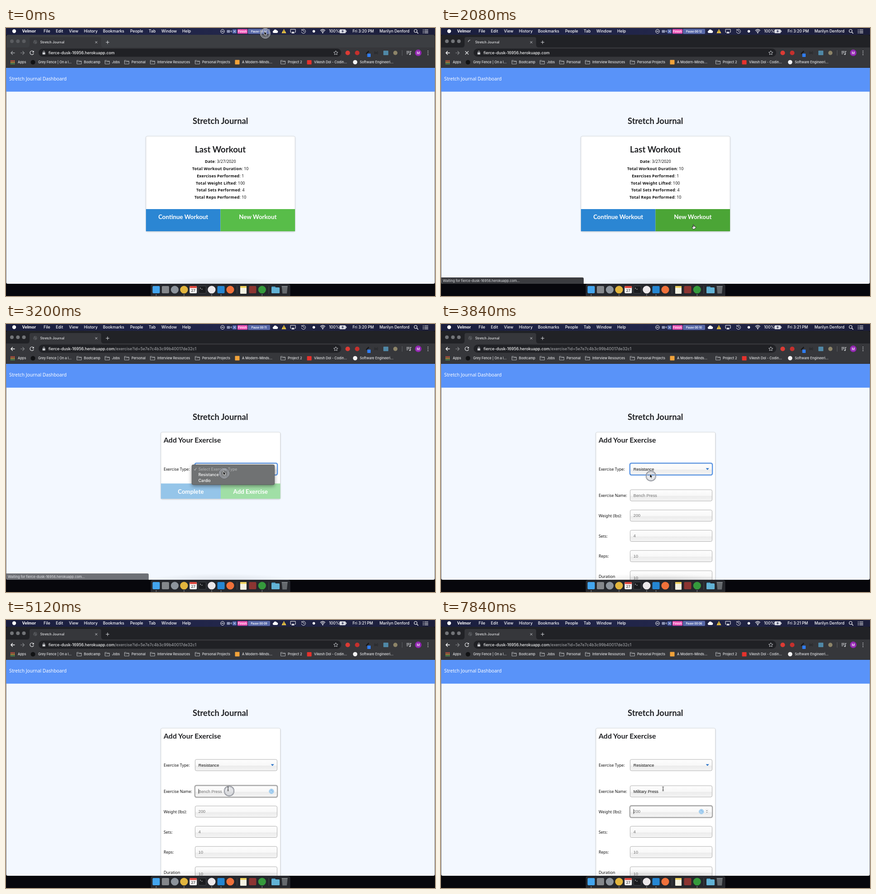
Animation of 947x592 px, one loop 8 s. Source, as an HTML page:

```html
<!DOCTYPE html>
<html lang="en">
<head>
<meta charset="utf-8">
<title>Workout demo</title>
<style>
html, body { margin: 0; width: 100%; height: 100%; overflow: hidden; background: #07070c; }
svg { display: block; width: 947px; height: 592px; }
text { white-space: pre; }
.ui { font-family: Inter, "Liberation Sans", sans-serif; font-weight: 500; }
.head { font-family: Lato, sans-serif; font-weight: 700; }
.body { font-family: "Noto Sans", "Open Sans", sans-serif; font-weight: 500; }
.form { font-family: "Liberation Sans", Arial, sans-serif; }
.strong { font-weight: 600; }
</style>
</head>
<body>
<svg id="stage" viewBox="0 0 947 592" xmlns="http://www.w3.org/2000/svg"></svg>
<script>
const LOOP = 8000, STEP = 160;
const APP = 'Stretch Journal';
const HOST = 'fierce-dusk-16956.herokuapp.com';

// Markup helpers
const text = (cls, x, y, size, fill, s, more = '') =>
  `<text class="${cls}" x="${x}" y="${y}" font-size="${size}" fill="${fill}" ${more}>${s}</text>`;
const rect = (x, y, w, h, fill, r = 0, more = '') =>
  `<rect x="${x}" y="${y}" width="${w}" height="${h}" rx="${r}" fill="${fill}" ${more}/>`;
const disc = (x, y, r, fill, more = '') =>
  `<circle cx="${x}" cy="${y}" r="${r}" fill="${fill}" ${more}/>`;
const line = (d, stroke, w = 1, more = '') =>
  `<path d="${d}" fill="none" stroke="${stroke}" stroke-width="${w}" ${more}/>`;
const shape = (d, fill, more = '') => `<path d="${d}" fill="${fill}" ${more}/>`;
const group = (id, s, more = '') => `<g id="${id}" ${more}>${s}</g>`;
const mid = 'text-anchor="middle"';

const defs = `<defs>
  <linearGradient id="bar"><stop stop-color="#1a1e3e"/><stop offset=".5" stop-color="#22264a"/><stop offset="1" stop-color="#1c1e3a"/></linearGradient>
  <linearGradient id="gloss" x2="0" y2="1"><stop stop-color="#fdfdfd"/><stop offset=".52" stop-color="#f8f8f8"/>
    <stop offset=".58" stop-color="#ececec"/><stop offset="1" stop-color="#f5f5f5"/></linearGradient>
  <radialGradient id="halo"><stop offset=".3" stop-color="#000" stop-opacity=".07"/><stop offset="1" stop-color="#000" stop-opacity="0"/></radialGradient>
  <filter id="shade" x="-10%" y="-10%" width="120%" height="125%"><feDropShadow dx="0" dy="1" stdDeviation="1.3" flood-opacity=".24"/></filter>
  <filter id="deep" x="-10%" y="-30%" width="120%" height="180%"><feDropShadow dx="0" dy="3" stdDeviation="4" flood-opacity=".4"/></filter>
  <clipPath id="view"><rect x=".5" y="15" width="946" height="550" rx="3.5"/></clipPath>
</defs>`;

function menuBar() {
  const items = [['File', 83], ['Edit', 110], ['View', 139], ['History', 172], ['Bookmarks', 214],
    ['People', 274], ['Tab', 315], ['Window', 343], ['Help', 389]];
  const white = '#fff', size = 8.75;
  return rect(0, 0, 947, 15, 'url(#bar)') + disc(18, 7, 4.2, white) +
    text('ui', 35.5, 10.3, size, white, 'Velmor', 'style="font-weight:700"') +
    items.map(([s, x]) => text('ui', x, 10.3, size, white, s)).join('') +
    disc(478, 7.3, 4.2, 'none', 'stroke="#fff"') + line('M475.5 7.3H480.5', white, 1.2) +
    rect(487.5, 4.5, 7, 6, '#8f96b5', 1) + shape('M495 7L498.5 4.6V10.4Z', '#8f96b5') +
    rect(500, 3, 9, 9, '#5467ac', 1) + line('M502.5 5.5L506.5 9.5M506.5 5.5L502.5 9.5', white, 1) +
    rect(511, 2.5, 22, 10, '#ee4fb4', 1) + text('ui strong', 522, 9.8, 6.7, white, 'Finish', mid) +
    rect(534.5, 2.5, 48, 10, '#5667a8', 1, 'stroke="#7383c2" stroke-width=".7"') +
    text('ui strong', 558.5, 9.6, 5.9, white, '', mid + ' id="pause"') +
    shape('M591 11a2.6 2.6 0 0 1-.3-5.1 3.8 3.8 0 0 1 7-.6 2.9 2.9 0 0 1 .5 5.7Z', white) +
    shape('M613.5 2.2L618.6 11.6H608.4Z', '#f6cf4a') + line('M613.5 5V8.4M613.5 9.4V10.4', '#4b3a10', 1.1) +
    line('M630.5 9.3H628V3H639V9.3H636.5', white, 1) + shape('M633.5 7.2L637 11.8H630Z', white) +
    line('M653.2 4.6a4.5 4.5 0 1 1-.9 3.4M652.4 2.8L653 5.3 655.6 4.9M657 4.6V7.5L659 8.6', white, .9) +
    disc(679.5, 7.3, 2.8, white) +
    line('M693.8 5.6Q699.2 .9 704.6 5.6M695.6 7.7Q699.2 4.7 702.8 7.7M697.4 9.6Q699.2 8.1 701 9.6', white, 1.3) +
    disc(699.2, 11, .9, white) +
    text('ui', 713, 10.3, 8.5, white, '100%') + rect(736.5, 3.5, 13, 7.5, '#d6d8e2', 1.2, 'stroke="#fff" stroke-width=".8"') +
    rect(750.5, 5.5, 1.2, 3.5, white) + shape('M744 3.5L740.5 7.8H743L742 11 745.8 6.6H743.2Z', '#24284a') +
    text('ui', 765, 10.3, 8.6, white, '', 'id="clock"') +
    text('ui', 824.5, 10.3, 8.6, white, 'Marilyn Denford') +
    disc(904.2, 6.5, 3.2, 'none', 'stroke="#fff" stroke-width="1.1"') + line('M906.6 8.9L910 12.2', white, 1.3) +
    line('M920 4H922M923.5 4H932M920 7.3H922M923.5 7.3H932M920 10.6H922M923.5 10.6H932', white, 1.2);
}

const folder = x => line(`M${x - 5} 71.5h3.6l1.4 1.5h5v6.5h-10Z`, '#b9bbbf', .9) + line(`M${x - 5} 74.4h10`, '#b9bbbf', .8);

function browser() {
  const icon = '#d0d2d6', tab = '#36373b';
  const folders = [['Bootcamp', 172], ['Jobs', 234], ['Personal', 277], ['Interview Resources', 334],
    ['Personal Projects', 433], ['Project 2', 622]];
  const links = [['Apps', 26], ['Grey Fence | On a l...', 71], ['A Modern-Minds...', 521],
    ['Vikesh Dol - Codin...', 680], ['Software Engineeri...', 781]];
  const label = ([s, x]) => text('ui', x, 78.3, 7.45, '#e2e3e5', s);
  let dots = '';
  for (let i = 0; i < 9; i++)
    dots += rect(10.2 + i % 3 * 3.3, 71.3 + (i / 3 | 0) * 3.3, 2.3, 2.3, ['#e2553f', '#e9a93a', '#57ab5c'][i / 3 | 0]);

  return rect(.5, 15, 946, 73, '#212226', 3.5, 'id="strip"') +
    group('lights', [13, 26.3, 39.5].map(x => disc(x, 29.3, 4)).join('')) +
    shape('M46 43Q52 43 52 37V24Q52 20 56 20H206Q210 20 210 24V37Q210 43 216 43Z', tab) +
    rect(.5, 43, 946, 45, tab) + rect(.5, 87.2, 946, .8, '#2b2c30') +
    group('globe', disc(64.5, 31, 4.4, '#55575b') + line('M61 29.4Q64 31 63.5 34.8M65 27.2Q64.5 30 68.4 31', tab, 1)) +
    line('M60.3 31A4.3 4.3 0 0 1 64.5 26.7', '#d5d7db', 1.3, 'id="spinner"') +
    text('ui', 75.5, 33.8, 7.3, '#e4e5e7', APP) +
    line('M197 29.3L201.5 33.8M201.5 29.3L197 33.8', icon, 1) + line('M220.5 31.5H228M224.2 27.8V35.3', icon, 1.1) +
    line('M19.5 55H11M14.8 51L10.9 55 14.8 59', '#fff', 1.3, 'id="back"') +
    line('M32 55H40.3M36.5 51L40.4 55 36.5 59', '#85878b', 1.2) +
    group('reload', line('M60.6 52.2A4.2 4.2 0 1 0 61.2 56', '#e4e5e7', 1.2) + shape('M61.6 50.2V54H57.8Z', '#e4e5e7')) +
    group('stop', line('M53.5 51.3L60.7 58.5M60.7 51.3L53.5 58.5', '#e4e5e7', 1.3)) +
    rect(72, 45.5, 668, 18, '#202125', 9) +
    rect(80.6, 54, 6, 4.6, icon, .7) + line('M82 54V52.4a1.6 1.6 0 0 1 3.2 0V54', icon, 1) +
    `<text class="ui" x="93.7" y="58" font-size="8.8" fill="#f0f1f2">${HOST}<tspan id="path" fill="#9b9da1"></tspan></text>` +
    line('M728 50.2L729.4 53.2 732.7 53.6 730.3 55.8 730.9 59 728 57.4 725.1 59 725.7 55.8 723.3 53.6 726.6 53.2Z', icon, .9) +
    disc(754.3, 55, 5.1, '#dc3b34') + disc(775.3, 55, 5.1, '#c5302d') +
    line('M795 57L801 51', '#17181a', 2.5) + rect(797.5, 56.5, 7.5, 7.5, '#2f7cf0', .8) +
    text('ui', 817, 57.4, 7, '#1b1c1f', '(x)', mid) + rect(833, 50, 11, 10, '#4f87a6', 1) +
    disc(859.5, 55, 4.7, '#8d8468') + line('M874.5 49V61', '#5b5d61', 1) +
    line('M884 51.5H891M884 54.2H891M884 57H888M892.8 58V51.5H895', icon, 1.2) + disc(891.6, 58, 1.5, icon) +
    disc(910, 54.8, 7.2, '#9327b2') + text('ui', 910, 57.5, 7.3, '#fff', 'M', mid) +
    [51, 55, 59].map(y => disc(931.5, y, 1, icon)).join('') +
    dots + disc(59.5, 75.7, 5, '#111214') + rect(505.5, 70.5, 10, 10, '#f1a33a', 1) +
    rect(664.5, 71, 10, 9.5, '#e5322d', 1) + disc(770.7, 75.5, 4.8, '#f2f2f3') +
    folders.map(f => folder(f[1] - 10.5) + label(f)).join('') + links.map(label).join('');
}

const card = (x, w, h) => rect(x, 239, w, h, '#fff', 3, 'stroke="#d0d2d5" stroke-width=".8" filter="url(#shade)"');
const button = (x, y, w, h, fill, s, id, base) =>
  rect(x, y, w, h, fill, 0, `id="${id}"`) + text('head', x + w / 2, base, 13.3, '#fff', s, mid);

function homePage() {
  const rows = [['Date', '3/27/2020'], ['Total Workout Duration', 10], ['Exercises Performed', 1],
    ['Total Weight Lifted', 100], ['Total Sets Performed', 4], ['Total Reps Performed', 10]];
  return group('home', card(309, 329, 210) +
    text('head', 473.2, 274.8, 18.6, '#202124', 'Last Workout', mid) +
    rows.map(([k, v], i) => text('body', 473.2, 298.4 + i * 15.75, 8.85, '#111',
      `<tspan font-weight="700" letter-spacing=".24">${k}</tspan>: ${v}`, mid)).join('') +
    button(309, 400, 164.5, 49, '#2b86d3', 'Continue Workout', 'resume', 422) +
    button(473.5, 400, 164.5, 49, '#58bd49', 'New Workout', 'fresh', 422));
}

const field = y => rect(417.5, y, 181, 25, 'url(#gloss)', 3.2, 'stroke="#a8a8a8" stroke-width=".9"');
const label = (y, s) => text('body', 348, y, 8.8, '#111', s);
const focusRing = (id, y, stroke) =>
  rect(416.9, y - .6, 182.2, 26.2, 'none', 3.6, `id="${id}" stroke="${stroke}" stroke-width="2.4"`);
const helper = (id, x, y) => group(id, disc(x, y, 5, '#d6ebfb', 'stroke="#6bb0e6" stroke-width="1"') +
  disc(x, y, 2.9, 'none', 'stroke="#3f92d8" stroke-width=".8"') + line(`M${x} ${y - 2}V${y}H${x + 1.7}`, '#3f92d8', .8));

function exercisePage() {
  const inputs = [['Exercise Name:', 366, 'Bench Press', 'name'], ['Weight (lbs):', 410.8, '200', 'weight'],
    ['Sets:', 455.5, '4', 'sets'], ['Reps:', 500.2, '10', 'reps'], ['Duration', 545, '10', 'time']];
  const more = inputs.map(([s, y, hint, id], i) => label(i < 4 ? y + 16.2 : 561, s) + field(y) +
    text('form', 424.8, y + (i < 4 ? 15.6 : 18.8), 9.2, '#707070', hint, `id="${id}"`)).join('');
  return group('exercise',
    group('short', card(342, 263.5, 147) +
      button(342, 352.3, 132, 33.7, '#95c5e9', 'Complete', 'done', 375) +
      button(474, 352.3, 131.5, 33.7, '#a0dfa6', 'Add Exercise', 'add', 375)) +
    group('long', card(342, 263.5, 400) + more +
      helper('nameHelp', 586, 378.5) + helper('weightHelp', 574.8, 423.2) +
      group('stepper', rect(584, 418, 6, 10.5, '#fbfbfb', 2, 'stroke="#ccc" stroke-width=".5"') +
        shape('M585.5 422L587 420 588.5 422ZM585.5 424.5L587 426.5 588.5 424.5Z', '#555')) +
      focusRing('nameRing', 366, '#a9a9a9') + focusRing('weightRing', 410.8, '#a9a9a9') +
      rect(0, 0, .9, 10.5, '#222', 0, 'id="caret"')) +
    text('head', 348, 261.8, 15.9, '#202124', 'Add Your Exercise') +
    label(324.2, 'Exercise Type:') + field(308) + focusRing('typeRing', 308, '#5b96e6') +
    text('form', 424.8, 323.7, 9.2, '#111', '', 'id="type"') + shape('M584.6 318.4H591.8L588.2 322.6Z', '#2a72c8') +
    group('menu', rect(410.3, 311, 182.4, 44, '#707273', 3, 'stroke="#4d4f50" stroke-width=".8" filter="url(#deep)"') +
      rect(410.7, 326.7, 181.6, 12.4, '#2f73dc', 0, 'id="pick"') +
      line('M415.3 320.8L417.2 323 420.3 317.8', '#b5b6b7', 1.1) +
      text('ui', 424.8, 323.6, 8.6, '#adaeaf', 'Select Exercise Type') +
      text('ui', 424.8, 336, 8.6, '#fff', 'Resistance') + text('ui', 424.8, 348.5, 8.6, '#fff', 'Cardio')));
}

const page = () => `<g clip-path="url(#view)">` + rect(0, 88, 947, 477, '#f3f8ff') + rect(0, 88, 947, 52.6, '#5993f9') +
  text('body', 7, 115.6, 10.25, '#fff', APP + ' Dashboard') +
  text('head', 473.2, 212.3, 18.4, '#202124', APP, mid) +
  homePage() + exercisePage() +
  group('status', shape('M0 551H312Q315 551 315 554V566H0Z', '#3b3c40') +
    text('ui', 4, 560.8, 7.4, '#c9cacd', `Waiting for ${HOST}...`)) +
  '<ellipse cx="473" cy="567" rx="168" ry="16" fill="url(#halo)"/></g>';

function dock() {
  const round = (x, c) => disc(x, 578, 8.6, c), square = (x, c) => rect(x - 8, 570, 16, 16, c, 2);
  return rect(320, 566, 307, 28, '#25272c', 4, 'stroke="#3a3c41" stroke-width=".6"') +
    square(331.5, '#43a5ee') + square(352, '#84878b') + round(372.5, '#8d949c') + round(393, '#e2b53d') +
    square(413.3, '#f5f5f5') + rect(405.3, 570, 16, 4.5, '#e0483e', 2) + text('ui', 413.3, 583, 8, '#333', '27', mid) +
    rect(425.2, 570, 16.5, 16, '#1a1b1e', 2, 'stroke="#55575b" stroke-width=".7"') + line('M428 573.5L430 575 428 576.5M431 577H434', '#ddd', .8) +
    round(454, '#ece8ea') + square(474.6, '#2586d2') + round(495, '#f0713a') + line('M510 570V587', '#55575b', .8) +
    rect(517, 570, 14, 17, '#f4f2e2', 1) + rect(517, 570, 14, 4, '#f0d25d', 1) + square(544.5, '#8c3532') + round(565.3, '#359a3c') +
    line('M580 570V587', '#55575b', .8) + rect(586, 571, 9, 5, '#4b9bc2', 1.5) + rect(586, 573, 18, 13, '#62b2d5', 1.5) +
    shape('M608.6 570.5H621.6L620 586.5H610.2Z', '#65696d') + line('M608.6 570.8H621.6', '#999da1', 1.2) +
    [331.5, 393, 454, 474.6, 565.3].map(x => disc(x, 589.6, .9, '#d0d2d5')).join('');
}

const cursor = group('cursor',
  group('ring', disc(2.4, 4.8, 10.7, 'rgba(150,155,170,.22)', 'stroke="#444852" stroke-width="1.8"') +
    disc(2.4, 4.8, 10.7, 'none', 'stroke="#e4e6ec" stroke-width="1"') +
    disc(2.4, 4.8, 8.3, 'none', 'stroke="#d5d8e0" stroke-width=".7"')) +
  group('arrow', shape('M0 0V9L2 7.2 3.4 10.2 4.9 9.5 3.6 6.7H6.3Z', '#111', 'stroke="#fff" stroke-width=".8"')) +
  group('hand', shape('M-1.6 5V-.9Q-.8-2.2 0-.9V2.5Q1.2 1.6 1.6 2.9 2.8 2.2 3.1 3.4 4.6 3 4.5 4.7 4.6 7-.0 9H-1.3Q-2.5 7-4.2 5Q-4.4 3.6-2.8 4Z',
    '#fff', 'stroke="#111" stroke-width=".9"')) +
  group('beam', line('M-1.8-4.6Q0-4.6 0-3.2V3.2Q0 4.6-1.8 4.6M1.8-4.6Q0-4.6 0-3.2M0 3.2Q0 4.6 1.8 4.6M-1 1.2H1', '#222', .9)));

document.getElementById('stage').innerHTML =
  defs + rect(0, 0, 947, 592, '#07070c') + browser() + page() + dock() + menuBar() + cursor;

const el = {};
document.querySelectorAll('#stage [id]').forEach(n => el[n.id] = n);
const show = (id, on) => el[id].style.display = on ? '' : 'none';
const put = (id, s) => { if (el[id].textContent !== s) el[id].textContent = s; };
const paint = (id, fill) => el[id].setAttribute('fill', fill);
const within = (t, a, b) => t >= a && t < b;

// Event times in ms
const ACTIVE = 320, PRESS = 1600, LOADED = 2400, OPEN = 3040, CHOSEN = 3840, NAME = 5120, TYPING = 5700, WEIGHT = 7680;
const CLICKS = [0, PRESS, OPEN, CHOSEN - 160, NAME - 160];
const TICKS = [240, 1280, 2320, 3340, 4400, 5400, 6400, 7360];
const TYPED = 'Military Press';
const TRACK = [[0, 570, 7], [160, 570, 7], [1120, 538.7, 420.3], [1600, 558, 435.5], [2400, 558, 435.5], [3040, 479.3, 325],
  [3360, 479.3, 325], [3600, 461, 331], [3840, 461, 331], [4320, 530.3, 372.3], [4480, 530.3, 372.3], [4960, 490.2, 373], [LOOP, 490.2, 373]];

function pointer(t) {
  const i = TRACK.findIndex(k => k[0] > t);
  const [a, x, y] = TRACK[i - 1], [b, u, v] = TRACK[i];
  const p = (t - a) / (b - a), e = p * p * (3 - 2 * p);
  return [x + (u - x) * e, y + (v - y) * e];
}

function draw(t) {
  const active = t >= ACTIVE, loading = within(t, PRESS, LOADED + 160);
  const loaded = t >= LOADED, chosen = t >= CHOSEN;
  const inName = within(t, NAME, WEIGHT), inWeight = t >= WEIGHT;

  put('pause', 'Pause 00:' + String(14 - TICKS.filter(k => k <= t).length).padStart(2, '0'));
  put('clock', chosen ? 'Fri 3:21 PM' : 'Fri 3:20 PM');
  paint('strip', active ? '#212226' : '#3c3e42');
  paint('lights', active ? '#727478' : '#5a5c60');
  el.back.setAttribute('stroke', active ? '#fff' : '#a0a2a6');
  show('reload', !loading);
  show('stop', loading);
  show('globe', !loading);
  show('spinner', loading);
  el.spinner.setAttribute('transform', `rotate(${(t - 2080) * -.36} 64.5 31)`);
  put('path', loaded ? '/exercise?id=5e7e7c4b3c99b40017de32c1' : '');

  show('home', !loaded);
  paint('fresh', t >= 1280 ? '#4ba536' : '#58bd49');
  show('exercise', loaded);
  show('short', !chosen);
  show('long', chosen);
  put('type', chosen ? 'Resistance' : 'Select Exercise Type');
  show('menu', within(t, OPEN, CHOSEN));
  show('pick', within(t, 3520, CHOSEN));
  show('typeRing', within(t, OPEN, NAME));
  show('status', within(t, PRESS + 160, 3520));
  el.status.style.opacity = Math.min(1, 1 - (t - 3040) / 570);

  const count = Math.min(TYPED.length, Math.max(0, Math.floor((t - TYPING) / 100) + 1));
  put('name', count ? TYPED.slice(0, count) : 'Bench Press');
  paint('name', count ? '#111' : '#707070');
  show('nameRing', inName);
  show('nameHelp', inName);
  for (const id of ['weightRing', 'weightHelp', 'stepper']) show(id, inWeight);
  show('caret', inName || inWeight);
  if (inName || inWeight) {
    const w = inName && count ? el.name.getComputedTextLength() : 0;
    el.caret.setAttribute('x', 424.8 + w);
    el.caret.setAttribute('y', inName ? 373.2 : 417.8);
  }

  const [x, y] = pointer(t), hand = within(t, 1280, LOADED), beam = t >= 4000;
  el.cursor.setAttribute('transform', `translate(${x} ${y})`);
  show('arrow', !hand && !beam);
  show('hand', hand);
  show('beam', beam);
  show('ring', CLICKS.some(c => within(t, c, c + 320)));
}

function frame() {
  draw(Math.floor(performance.now() % LOOP / STEP) * STEP);
  requestAnimationFrame(frame);
}
frame();
</script>
</body>
</html>
```
